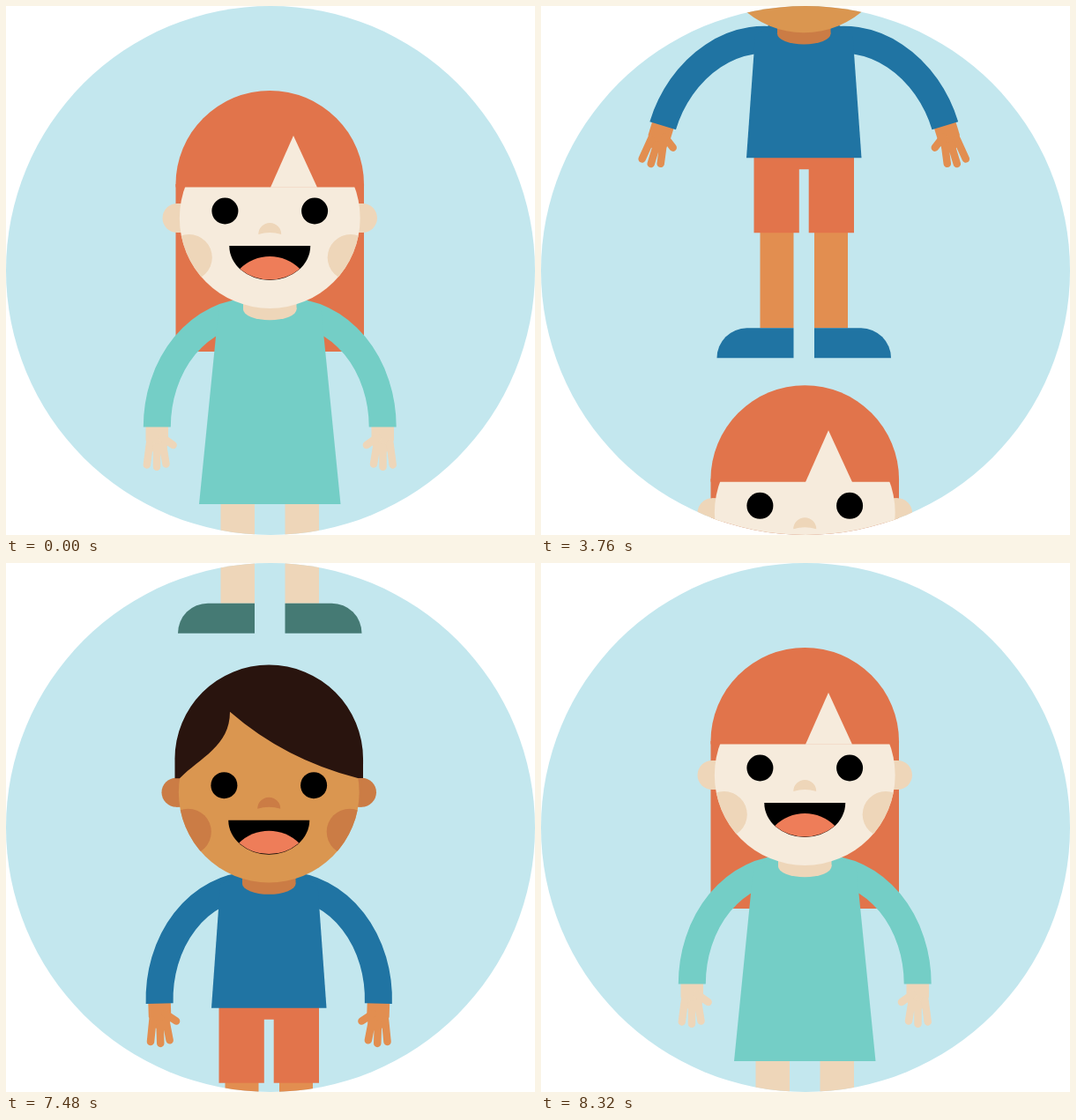
Animation, 600 px wide and 600 px high, one loop 8800 ms. Source, as an HTML page with a canvas:

```html
<!DOCTYPE html>
<html lang="en">
<head>
<meta charset="utf-8">
<title>Two kids</title>
<style>
  html, body { margin: 0; width: 100%; height: 100%; overflow: hidden; background: #fff; }
  canvas { display: block; width: 600px; height: 600px; }
</style>
</head>
<body>
<canvas id="stage" width="600" height="600"></canvas>
<script>
const ctx = document.getElementById('stage').getContext('2d');
const LOOP = 8800, STEP = 40, MID = 299.25;

const girl = {
  x: 0, y: 0, face: '#f6ebdc', blush: '#eed6b9', skin: '#eed6b9', hair: '#e1744b',
  top: '#74cec6', shoe: '#457a74', hem: [219, 565], armpit: 241,
  legs: [243.5, 282], legTop: 560, sole: 712, shut: 4,
  settle: { peak: 27.5, from: 760, to: 1360 }
};
const boy = {
  x: -1, y: -2, face: '#da9650', blush: '#cb7c45', skin: '#e28e50', hair: '#29140e',
  top: '#2074a3', shoe: '#2074a3', hem: [234, 485], armpit: 244,
  legs: [249.5, 287.5], legTop: 560, sole: 712, shut: 2.5, shorts: '#e2744b',
  settle: { peak: 21, from: 620, to: 1400 }
};

const clamp = v => Math.max(0, Math.min(1, v));
const smooth = v => { v = clamp(v); return v * v * (3 - 2 * v); };
const cubic = v => { v = clamp(v); return v < .5 ? 4 * v ** 3 : 1 - 4 * (1 - v) ** 3; };
const within = (t, a, b) => t >= a && t < b;

function fill(color, trace) {
  ctx.beginPath();
  trace();
  ctx.fillStyle = color;
  ctx.fill();
}
const rect = (color, x, y, w, h) => fill(color, () => ctx.rect(x, y, w, h));
const oval = (color, x, y, rx, ry = rx) =>
  fill(color, () => ctx.ellipse(x, y, rx, ry, 0, 0, 2 * Math.PI));
const poly = (color, ...points) =>
  fill(color, () => points.forEach(([x, y]) => ctx.lineTo(x, y)));

function scoped(draw) {
  ctx.save();
  draw();
  ctx.restore();
}

// Draws a left-hand part, then its reflection across the body axis.
function bothSides(draw) {
  draw();
  scoped(() => {
    ctx.translate(2 * MID, 0);
    ctx.scale(-1, 1);
    draw();
  });
}

function leg(kid) {
  const [left, right] = kid.legs, top = kid.sole - 34;
  rect(kid.skin, left, kid.legTop, right - left, top - kid.legTop);
  fill(kid.shoe, () => {
    const toe = right - 87;
    ctx.moveTo(toe, kid.sole);
    ctx.arc(toe + 34, kid.sole, 34, Math.PI, 1.5 * Math.PI);
    ctx.lineTo(right, top);
    ctx.lineTo(right, kid.sole);
  });
}

function arm(kid, degrees) {
  scoped(() => {
    ctx.translate(253, 355);
    ctx.rotate(degrees * Math.PI / 180);
    ctx.translate(-253, -355);

    poly(kid.skin, [158.5, 476], [184, 476], [184, 492], [182, 502],
      [172, 507], [162, 504], [158.5, 492]);
    ctx.strokeStyle = kid.skin;
    ctx.lineWidth = 8.5;
    ctx.lineCap = 'round';
    ctx.beginPath();
    for (const [x0, y0, x1, y1] of [
      [163, 496, 159.8, 520.5], [171, 500, 171, 522.8],
      [178, 498, 181.5, 519.5], [177, 489, 189.6, 498]
    ]) {
      ctx.moveTo(x0, y0);
      ctx.lineTo(x1, y1);
    }
    ctx.stroke();

    ctx.beginPath();
    ctx.ellipse(279, 477.5, 107.7, 130.5, 0, Math.PI, 1.5 * Math.PI);
    ctx.strokeStyle = kid.top;
    ctx.lineWidth = 31;
    ctx.lineCap = 'butt';
    ctx.stroke();
  });
}

function body(kid, swing) {
  bothSides(() => leg(kid));
  if (kid.shorts) {
    bothSides(() => rect(kid.shorts, 242.5, 480, 51.3, 90));
    rect(kid.shorts, 290, 480, 18, 18);
  }
  bothSides(() => arm(kid, swing));
  const [hemX, hemY] = kid.hem, far = x => 2 * MID - x;
  poly(kid.top, [hemX, hemY], [kid.armpit, 345], [262, 333],
    [far(262), 333], [far(kid.armpit), 345], [far(hemX), hemY]);
  rect(kid.blush, 269, 332, 60.5, 12);
  oval(kid.blush, MID, 344, 30.3, 12.2);
}

function girlHair() {
  fill(girl.hair, () => {
    ctx.arc(MID, 202.7, 106.8, Math.PI, 0);
    ctx.lineTo(406, 205.5);
    ctx.lineTo(192.5, 205.5);
  });
  poly(girl.face, [326, 147], [353, 205.7], [300, 205.7]);
}

function boyHair() {
  fill(boy.hair, () => {
    ctx.moveTo(192.5, 224.5);
    ctx.lineTo(192.5, 203);
    ctx.arc(MID, 202.7, 106.8, Math.PI, 0);
    ctx.lineTo(406, 224.3);
    ctx.lineTo(400, 224.3);
    ctx.quadraticCurveTo(317, 203, 255, 149);
    ctx.bezierCurveTo(255, 188, 221, 201, 198, 224.5);
  });
}

function mouth() {
  const shape = ry => () => ctx.ellipse(MID, 272, 46, ry, 0, 0, Math.PI);
  fill('#000', shape(39));
  scoped(() => {
    ctx.beginPath();
    shape(38.4)();
    ctx.clip();
    oval('#ee7d59', MID, 332.3, 48.3);
  });
}

function head(kid, shut) {
  bothSides(() => {
    oval(kid.blush, 194, 240.5, 16.5);
    rect(kid.blush, 194, 224, 14, 33);
  });
  oval(kid.face, MID, 240.5, 102.4);
  scoped(() => {
    ctx.beginPath();
    ctx.arc(MID, 240.5, 102.4, 0, 2 * Math.PI);
    ctx.clip();
    bothSides(() => oval(kid.blush, 207.6, 285.2, 26.2));
  });
  kid === girl ? girlHair() : boyHair();
  bothSides(() => oval('#000', 248.4, 232.5, 15, shut ? kid.shut : 15));
  fill(kid.blush, () => {
    ctx.arc(MID, 259, 13, Math.PI, 0);
    ctx.quadraticCurveTo(MID, 255, MID - 13, 259);
  });
  mouth();
}

function drawKid(kid, y, swing, shut) {
  if (Math.abs(y) > 640) return;
  scoped(() => {
    ctx.translate(kid.x, kid.y + y);
    if (kid === girl) rect(kid.hair, 192.5, 202, 213.5, 190);
    body(kid, swing);
    head(kid, shut);
  });
}

// The arms dip inward first, then fly out as the kid drops.
function leavingSwing(t) {
  return -8 * smooth((t + 40) / 360) + 24 * smooth((t - 320) / 600);
}

function arrivingSwing({ peak, from, to }, t) {
  return peak * (1 - smooth((t - from) / (to - from)));
}

function swap(leaving, arriving, distance, t, shut) {
  const moved = cubic((t - 307) / 1053);
  drawKid(leaving, distance * moved, leavingSwing(t), shut);
  drawKid(arriving, distance * (moved - 1), arrivingSwing(arriving.settle, t), shut);
}

function render(time) {
  const t = Math.floor(time % LOOP / STEP) * STEP;
  const shut = within(t, 320, 400) || within(t, 2600, 3000) ||
    within(t, 4200, 4600) || within(t, 7560, 7840);

  ctx.fillStyle = '#fff';
  ctx.fillRect(0, 0, 600, 600);
  scoped(() => {
    ctx.beginPath();
    ctx.arc(300, 300, 300, 0, 2 * Math.PI);
    ctx.clip();
    rect('#c3e7ee', 0, 0, 600, 600);

    if (within(t, 2920, 4320)) swap(girl, boy, 645, t - 2920, shut);
    else if (within(t, 6960, 8320)) swap(boy, girl, 654, t - 6960, shut);
    else drawKid(within(t, 4320, 6960) ? boy : girl, 0, 0, shut);
  });
}

let start;
function tick(now) {
  start ??= now;
  render(now - start);
  requestAnimationFrame(tick);
}
render(0);
requestAnimationFrame(tick);
</script>
</body>
</html>
```
